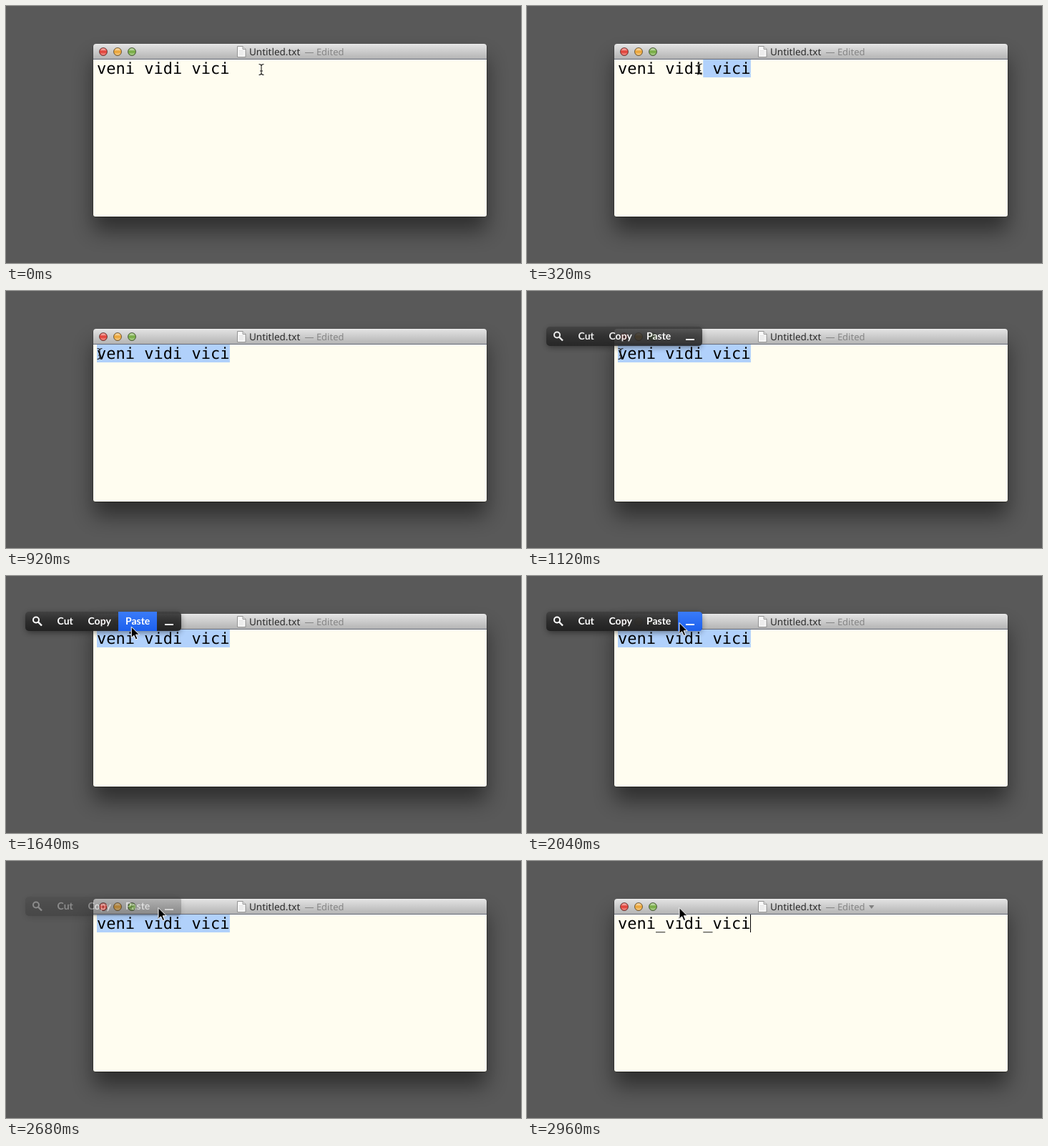
Recreate the animation shown at these times as an HTML page. Size 720 px wide and 360 px high, loop 4.46 s.

```html
<!DOCTYPE html>
<html lang="en">
<head>
<meta charset="utf-8">
<style>
  html, body { margin: 0; width: 100%; height: 100%; overflow: hidden; background: #595959; }
  svg { display: block; text-rendering: geometricPrecision; }
  .title { font-family: "Noto Sans", sans-serif; }
  .body { font: 22px "DejaVu Sans Mono", monospace; white-space: pre; }
  .menu { font: bold 14px Lato, sans-serif; fill: #fff; }
</style>
</head>
<body>
<svg width="720" height="360" viewBox="0 0 720 360">
  <defs>
    <linearGradient id="bar" x2="0" y2="1">
      <stop stop-color="#ececec"/><stop offset=".12" stop-color="#dedede"/><stop offset="1" stop-color="#b4b4b4"/>
    </linearGradient>
    <linearGradient id="dark" x2="0" y2="1">
      <stop stop-color="#414141"/><stop offset=".5" stop-color="#2c2c2c"/><stop offset="1" stop-color="#202020"/>
    </linearGradient>
    <linearGradient id="blue" x2="0" y2="1">
      <stop stop-color="#3a7bf8"/><stop offset="1" stop-color="#1c60ee"/>
    </linearGradient>
    <linearGradient id="gloss" x2="0" y2="1">
      <stop stop-color="#fff" stop-opacity=".75"/><stop offset=".45" stop-color="#fff" stop-opacity="0"/>
      <stop offset=".6" stop-color="#fff" stop-opacity="0"/><stop offset="1" stop-color="#fff" stop-opacity=".5"/>
    </linearGradient>
    <filter id="soft" x="-20%" y="-40%" width="140%" height="180%"><feGaussianBlur stdDeviation="15"/></filter>
    <filter id="small" x="-20%" y="-60%" width="140%" height="220%"><feGaussianBlur stdDeviation="4"/></filter>
  </defs>

  <rect width="720" height="360" fill="#595959"/>
  <rect x="122" y="73" width="550" height="242" rx="4" opacity=".48" filter="url(#soft)"/>
  <rect x="121.5" y="53" width="551" height="242.7" rx="4.5" opacity=".5"/>
  <rect x="122" y="60" width="550" height="235" rx="3" fill="#fffdf0"/>
  <path d="M122 74V57q0-4 4-4H668q4 0 4 4V74z" fill="url(#bar)"/>
  <path d="M122 74.5H672" stroke="#666c7c"/>
  <g id="lights"></g>

  <path d="M323.5 56.5h7.5l4 4v11h-11.5z" fill="#fafafa" stroke="#8a8a8a" stroke-width=".9"/>
  <path d="M331 56.5v4h4" fill="#ddd" stroke="#8a8a8a" stroke-width=".8"/>
  <path d="M325.5 62.5h7m-7 2h7m-7 2h7m-7 2h7" stroke="#d5d5d5" stroke-width=".7"/>
  <g class="title">
    <text x="340" y="69" font-size="13.5" fill="#2b2b2b">Untitled.txt</text>
    <text x="417.5" y="69" font-size="13" fill="#858585">— Edited</text>
  </g>
  <path id="arrowDown" d="M478 62h7.4l-3.7 5z" fill="#808080"/>

  <rect id="selection" y="75" height="25" fill="#b1d1fb"/>
  <text id="words" class="body" x="127" y="95"></text>
  <path id="caret" d="M312.5 75v25" stroke="#000"/>

  <g id="popup">
    <rect x="28" y="53" width="216" height="26" rx="5" opacity=".45" filter="url(#small)"/>
    <rect x="27" y="50" width="218" height="27" rx="5" fill="url(#dark)" opacity=".95"/>
    <path id="onPaste" d="M157 50h54v27h-54z" fill="url(#blue)"/>
    <path id="onLine" d="M211 50h29q5 0 5 5v17q0 5-5 5h-29z" fill="url(#blue)"/>
    <g fill="none" stroke="#fff" stroke-width="2">
      <circle cx="42" cy="61.5" r="4"/>
      <path d="M45 64.5l5 5" stroke-width="2.4"/>
      <path d="M222 68h12"/>
    </g>
    <g class="menu">
      <text x="71.5" y="68">Cut</text>
      <text x="114.5" y="68">Copy</text>
      <text x="167" y="68">Paste</text>
    </g>
  </g>

  <path id="beam" d="M-3.5-7.5q3 0 3.5 2q.5-2 3.5-2M0-5.5v11M-3.5 7.5q3 0 3.5-2q.5 2 3.5 2M-2 2h4" fill="none" stroke="#222" stroke-width="1.1"/>
  <path id="pointer" d="M0 0v15.5l3.6-3.3 2.5 5.8 2.6-1.1-2.5-5.7h5z" stroke="#fff" stroke-width="1"/>
</svg>
<script>
const LOOP = 4460, STEP = 40, LEFT = 127, CHAR = 13.245, LENGTH = 14;
const $ = id => document.getElementById(id);
const clamp = v => Math.min(1, Math.max(0, v));
const ramp = (t, a, b) => clamp((t - a) / (b - a));
const ease = u => u * u * (3 - 2 * u);
const show = (id, on) => $(id).setAttribute('opacity', Number(on));

// cursor legs: start, end, x, y
const legs = [
  [20, 580, 148, 88],
  [580, 920, 131, 88],
  [1160, 1620, 175, 71],
  [1620, 2040, 213, 65.5]
];

$('lights').innerHTML = ['#e2453c', '#eba63a', '#78ad45'].map((color, i) => {
  const at = `cx="${136 + 20 * i}" cy="64"`;
  return `<circle ${at} r="5.5" fill="${color}" stroke="#000" stroke-opacity=".5"/>
    <circle ${at} r="4.6" fill="url(#gloss)"/>`;
}).join('');

function cursorAt(t) {
  let x = 357, y = 89;
  for (const [start, end, toX, toY] of legs) {
    const u = ease(ramp(t, start, end));
    x += (toX - x) * u;
    y += (toY - y) * u;
  }
  return [x, y];
}

function draw(t) {
  const [x, y] = cursorAt(t);
  const done = t >= 2800;
  const overMenu = t > 1080 && y < 77;

  const first = Math.min(LENGTH, Math.max(0, Math.round((x - LEFT) / CHAR)));
  const from = t < 920 ? first : 0;
  $('selection').setAttribute('x', LEFT + from * CHAR);
  $('selection').setAttribute('width', done ? 0 : (LENGTH - from) * CHAR + (from < LENGTH ? .5 : 0));
  $('words').textContent = ['veni', 'vidi', 'vici'].join(done ? '_' : ' ');
  show('caret', done);
  show('arrowDown', ramp(t, 2760, 2960));

  show('popup', ramp(t, 1040, 1130) * (1 - ramp(t, 2220, 2770) ** 2));
  const lit = overMenu && t < 2160;
  show('onPaste', lit && x >= 157 && x < 211);
  show('onLine', lit && x >= 211);

  show('beam', !overMenu);
  show('pointer', overMenu);
  for (const id of ['beam', 'pointer']) $(id).setAttribute('transform', `translate(${x} ${y})`);
}

const began = performance.now();
function tick() {
  const t = (performance.now() - began) % LOOP;
  draw(Math.floor(t / STEP) * STEP);
  requestAnimationFrame(tick);
}
tick();
</script>
</body>
</html>
```
